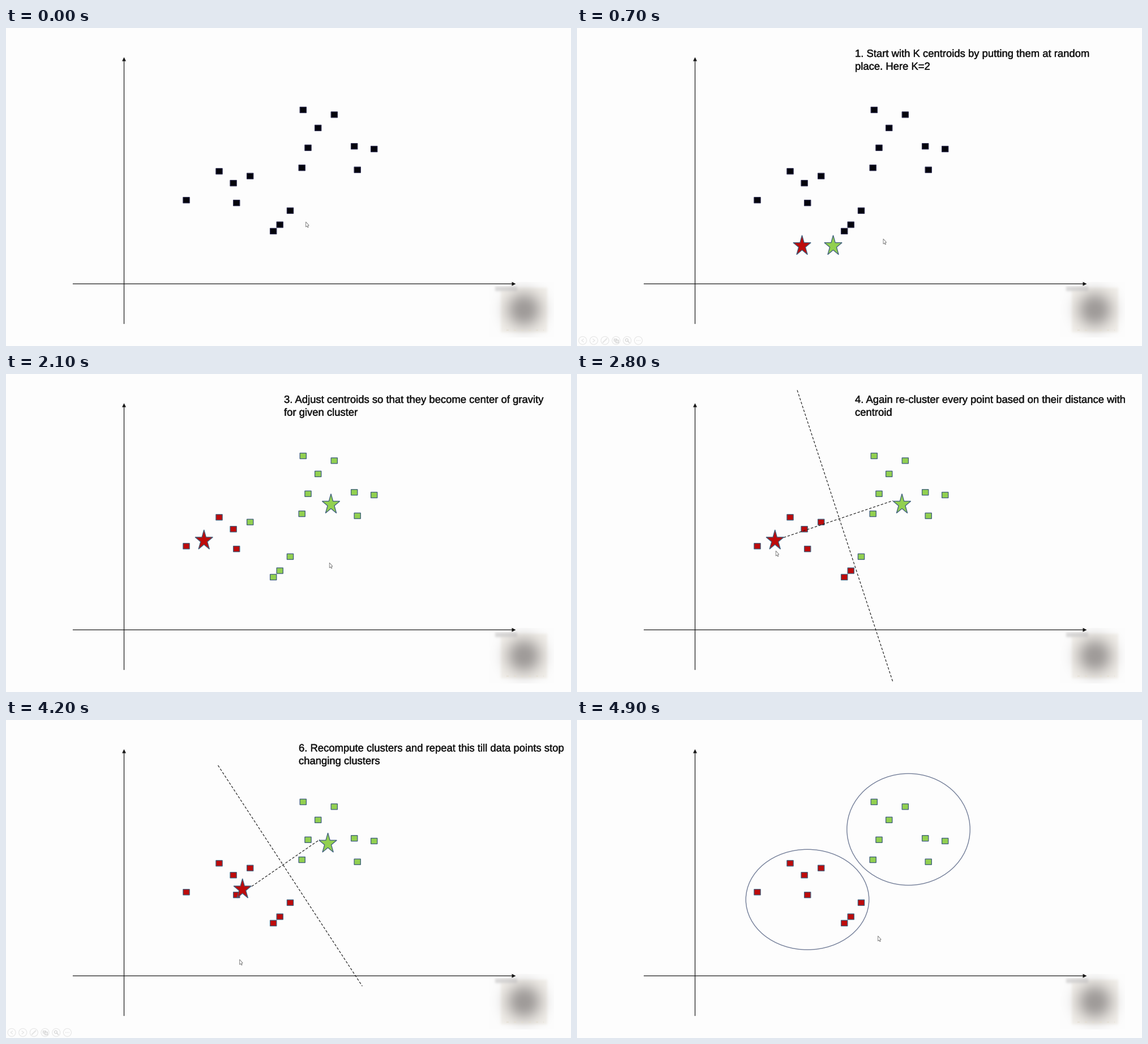
Animation, 998 px wide and 561 px high, one loop 5.6 s. Source, as a matplotlib script:

```python
import numpy as np
import matplotlib.pyplot as plt
from matplotlib import patheffects
from matplotlib.animation import ArtistAnimation
from matplotlib.patches import Circle, Ellipse, Polygon, Rectangle

W, H, DPI = 998, 561, 100
PX = 72 / DPI
RED, GREEN, BLACK = "#bd0b0b", "#92d050", "#05050c"
EDGE = "#3f5f7d"
INK = "#181818"

plt.rcParams["text.hinting"] = "none"
plt.rcParams["font.family"] = "Liberation Sans"
fig = plt.figure(figsize=(W / DPI, H / DPI), dpi=DPI, facecolor="#fdfdfd")
ax = fig.add_axes([0, 0, 1, 1])
ax.axis("off")

# ordered so that the red cluster is always a leading slice
POINTS = [
    (318.5, 303.7), (376.5, 252.8), (401.6, 273.7), (407.2, 308.6),
    (431.2, 261.2), (472.2, 358.4), (483.7, 347), (502, 322.2),
    (524.8, 144.5), (579.8, 152.9), (551.2, 176.3), (533.5, 211.3),
    (522.7, 246.6), (615.2, 208.7), (650.2, 213.5), (620.7, 250.2),
]


def line(xs, ys, color=INK, width=1.2, **kw):
    return ax.plot(xs, ys, color=color, lw=width * PX, **kw)[0]


def dashed(a, b, width=1.15):
    return line(*zip(a, b), width=width, dashes=(3.8, 2.5),
                dash_capstyle="butt", zorder=4)


def shape(points, fill, edge, width, z):
    return ax.add_patch(Polygon(points, closed=True, fc=fill, ec=edge,
                                lw=width * PX, zorder=z))


def squares(red=None):
    out = []
    for i, (x, y) in enumerate(POINTS):
        fill = BLACK if red is None else RED if i < red else GREEN
        edge = "#2b2b4c" if red is None else EDGE
        out.append(ax.add_patch(Rectangle(
            (x - 5.6, y - 5), 11.2, 10, fc=fill, ec=edge,
            lw=1.3 * PX, snap=False, zorder=3)))
    return out


def star(x, y, fill):
    angle = np.arange(10) * np.pi / 5
    r = np.where(np.arange(10) % 2, 0.382, 1)
    points = np.c_[x + 16.4 * r * np.sin(angle),
                   y + 1 - 18.8 * r * np.cos(angle)]
    return shape(points, fill, EDGE, 1.3, 5)


def stars(red, green):
    return [star(*red, RED), star(*green, GREEN)]


def caption(first, second="", x=491, y=51):
    bold = [patheffects.withStroke(linewidth=0.45 * PX, foreground=INK)]
    return [ax.text(x, y + 22.6 * i, s, size=18.45 * PX, color=INK,
                    va="baseline", path_effects=bold, zorder=6)
            for i, s in enumerate((first, second)) if s]


def cursor(x, y):
    arrow = np.array([(0, 0), (0, 9), (2, 7.2), (3.3, 10), (4.6, 9.4),
                      (3.4, 6.7), (5.6, 6.3)])
    return shape(arrow + (x, y), "#ffffff", "#7c7c7c", 0.9, 7)


def toolbar():
    c, dark, y = "#e4e4e4", "#d4d4d4", 551.3
    xs = [10, 29.7, 49.3, 69, 88.7, 108.4]
    out = [ax.add_patch(Circle((x, y), 7, fc="none", ec=c, lw=PX))
           for x in xs]
    for x, s in ((xs[0], 1), (xs[1], -1)):
        out.append(line([x + 1.5 * s, x - 1.8 * s, x + 1.5 * s],
                        [y - 2.5, y, y + 2.5], c))
    pen, slides, lens, more = xs[2:]
    out.append(line([pen - 3.2, pen + 3], [y + 3.2, y - 3], c, 2))
    for d in (-1.2, 1.2):
        out.append(ax.add_patch(Rectangle(
            (slides + d - 2.6, y + d - 2.2), 5.2, 4.4,
            fc="#eeeeee", ec=dark, lw=PX)))
    out.append(ax.add_patch(Circle((lens - 0.8, y - 0.8), 2.4, fc="none",
                                   ec=dark, lw=1.2 * PX)))
    out.append(line([lens + 1, lens + 3.6], [y + 1, y + 3.6], dark, 1.4))
    out += [ax.add_patch(Circle((more + d, y), 0.8, fc=c, ec="none"))
            for d in (-2.8, 0, 2.8)]
    return out


def ring(x, y, w, h):
    return ax.add_patch(Ellipse((x, y), w, h, fc="none", ec="#747f99",
                                lw=1.4 * PX, zorder=2))


def soft_box(x, y, x0, x1, y0, y1, s):
    def edge(v):
        return 1 / (1 + np.exp(-np.clip(v / s, -40, 40)))
    return edge(x - x0) * edge(x1 - x) * edge(y - y0) * edge(y1 - y)


def blurred_patch():
    x0, x1, y0, y1 = 854, 968, 448, 546
    x, y = np.meshgrid(np.arange(x0, x1) + 0.5, np.arange(y0, y1) + 0.5)
    img = np.full(x.shape + (3,), 253.0)

    def blend(color, amount):
        img[:] += (np.array(color) - img) * amount[..., None]

    blend((243, 240, 235), soft_box(x, y, 874, 956, 458, 537, 1.3))
    blend((212, 211, 211), 0.9 * soft_box(x, y, 864, 903, 456, 464, 1.3))
    r = np.hypot(x - 915, y - 497)
    blend((160, 156, 154), np.exp(-(r / 32) ** 2.4))
    dots = (np.abs(y - 533) < 1) & (x > 880) & (x < 950) & (x % 13 < 4)
    blend((226, 220, 205), 0.6 * dots)
    ax.imshow(img / 255, extent=(x0, x1, y1, y0), aspect="auto", zorder=0)


def axes():
    y = 451.4
    line([208.5, 208.5], [56, 521])
    line([118.5, 896], [y, y], snap=False)
    shape([(208.5, 51.5), (205, 58.5), (212, 58.5)], INK, "none", 0, 2)
    shape([(900.5, y), (893.5, y - 3.5), (893.5, y + 3.5)], INK, "none", 0, 2)


START = (397.5, 383.5), (452.5, 383.5)
MOVED = (349.7, 292.7), (574, 229.2)
FINAL = (417.7, 297.7), (568.6, 217)

blurred_patch()
axes()
scenes = [
    [*squares(), cursor(529.6, 342)],
    [*squares(), *stars(*START), cursor(541, 372), *toolbar(),
     *caption("1. Start with K centroids by putting them at random",
              "place. Here K=2")],
    [*squares(4), *stars(*START), cursor(552.2, 402.5),
     dashed((425.5, 53), (425.5, 551)),
     dashed((414, 378), (437, 378), 1),
     *caption("2. Compute distance of every point from centroid and",
              "cluster them accordingly")],
    [*squares(4), *stars(*MOVED), cursor(571.3, 333),
     *caption("3. Adjust centroids so that they become center of gravity",
              "for given cluster")],
    [*squares(7), *stars(*MOVED), cursor(351.2, 312),
     dashed((389, 28.5), (558, 543.5)),
     dashed((365, 288.5), (558, 223.5)),
     *caption("4. Again re-cluster every point based on their distance with",
              "centroid")],
    [*squares(7), *stars(*FINAL), cursor(382, 367),
     *caption("5. Again adjust centroids", x=517, y=55.4)],
    [*squares(8), *stars(*FINAL), cursor(412.6, 422.5), *toolbar(),
     dashed((374.5, 80), (629.3, 469.5)),
     dashed((434, 293.5), (554, 211)),
     *caption("6. Recompute clusters and repeat this till data points stop",
              "changing clusters", x=517, y=55.4)],
    [*squares(8), ring(407, 316.8, 217.5, 177),
     ring(585.5, 193, 217.5, 197), cursor(531.6, 381)],
]
ax.set_xlim(0, W)
ax.set_ylim(H, 0)

anim = ArtistAnimation(fig, scenes, interval=700, repeat=True, repeat_delay=0)
plt.show()
```
